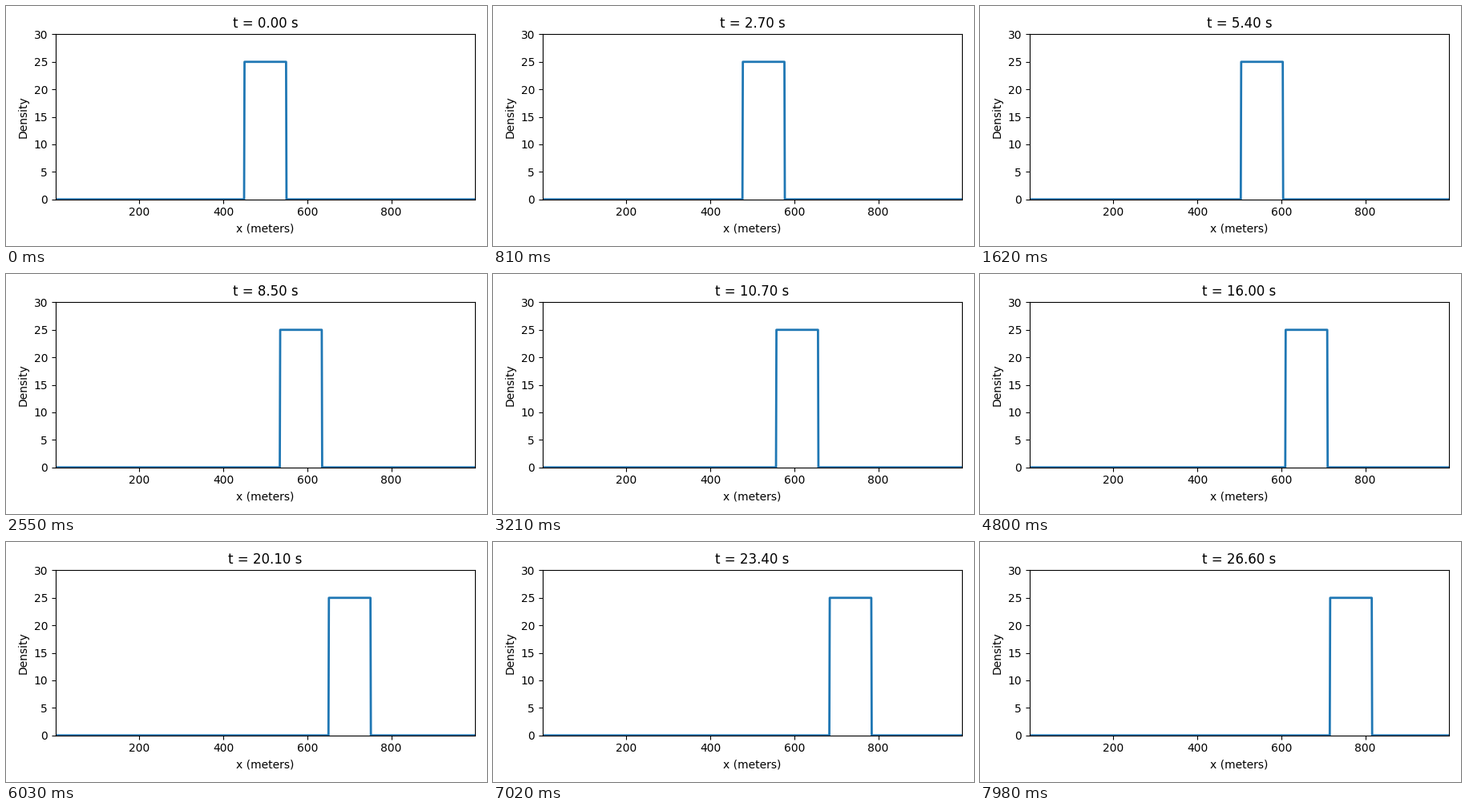
A matplotlib script for the animation above (8000 ms loop, 600 by 300 pixels).

```python
import numpy as np
import matplotlib.pyplot as plt
from matplotlib.animation import FuncAnimation

LENGTH, CELL = 1000.0, 1.0
SPEED, DT = 10.0, 0.1
STEPS, INTERVAL = 267, 8000 / 267

x = np.arange(CELL / 2, LENGTH, CELL)


def density(step):
    """Block of cars carried along at constant speed."""
    shift = SPEED * DT * step
    return np.where((x > 450 + shift) & (x < 550 + shift), 25.0, 0.0)


fig, ax = plt.subplots(figsize=(6, 3), dpi=100)
line, = ax.plot(x, density(0), lw=2)
ax.set_xlim(x[0], x[-1])
ax.set_ylim(0, 30)
ax.set_yticks(range(0, 31, 5))
ax.set_xlabel("x (meters)")
ax.set_ylabel("Density")
title = ax.set_title("t = 0.00 s")
fig.tight_layout()
fig.subplots_adjust(top=0.882)


def update(step):
    line.set_ydata(density(step))
    title.set_text(f"t = {step * DT:.2f} s")
    return line, title


anim = FuncAnimation(fig, update, frames=STEPS, interval=INTERVAL,
                     repeat=True, repeat_delay=0, blit=False)
plt.show()
```
